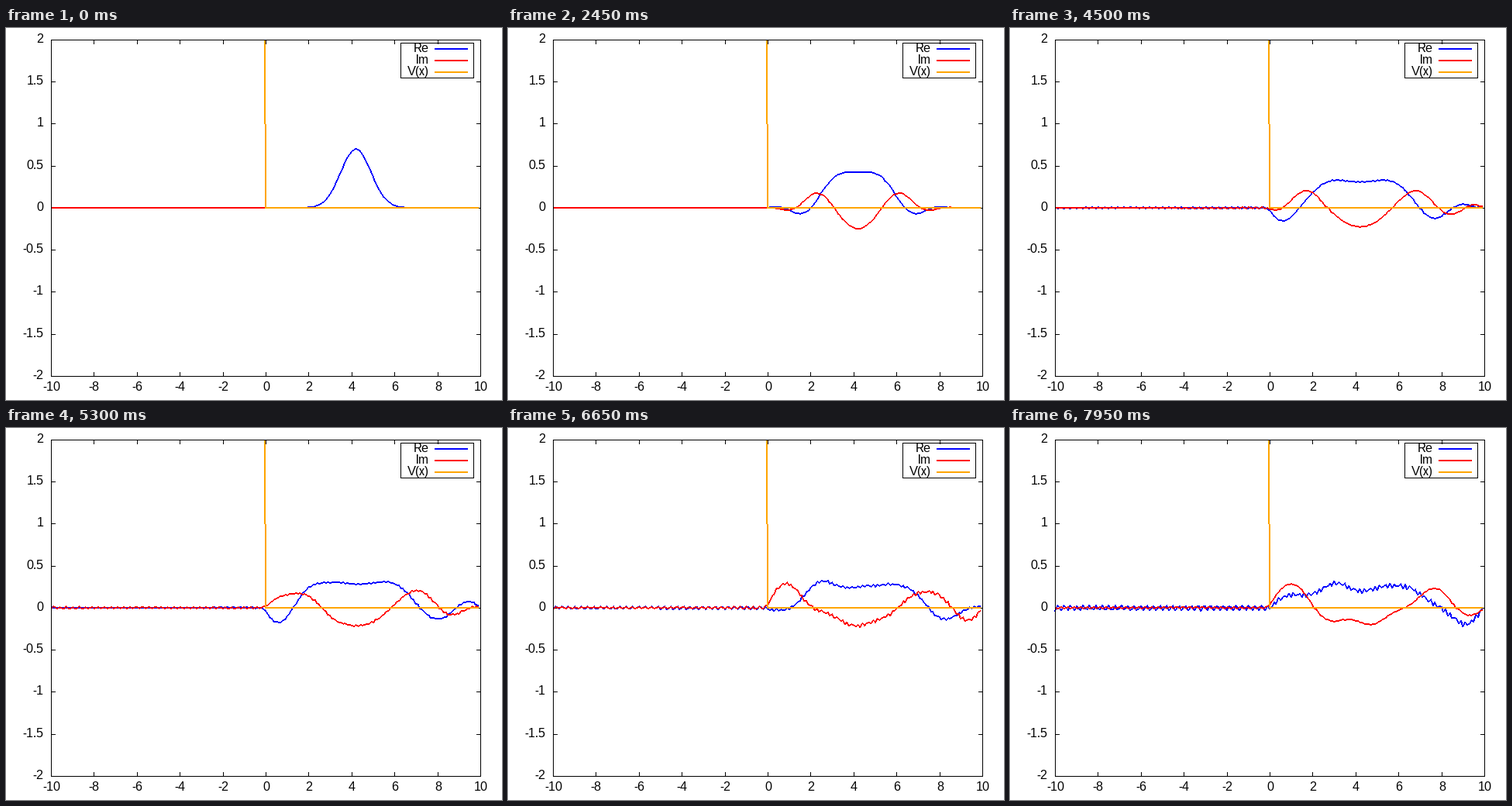
A matplotlib script for the animation above (8 s loop, 640 px wide and 480 px high).

```python
import numpy as np
import matplotlib.pyplot as plt
from matplotlib.animation import FuncAnimation

W, H, DPI = 640, 480, 100
FRAMES, INTERVAL = 160, 50
LEFT, RIGHT, TOP, BOTTOM = 58, 612, 15, 449
PX = 72 / DPI
BLUE, RED, ORANGE = (0, 0, 255), (255, 0, 0), (255, 165, 0)

# Split-step evolution of a Gaussian packet beside a high wall (x < 0).
N = 200
SPREAD = 0.0355 / 4      # kinetic phase per step for k = 1
WALL = 2.34              # potential phase per step
x = -10 + 20 / N * np.arange(N)
k = 2 * np.pi * np.fft.fftfreq(N, 20 / N)


def evolve():
    psi = 0.7 * np.exp(-(x - 4.2) ** 2) + 0j
    half = np.exp(-0.5j * WALL * (np.arange(N) < N // 2))
    drift = np.exp(-1j * SPREAD * k ** 2)
    states = [psi]
    for _ in range(FRAMES - 1):
        psi = half * np.fft.ifft(drift * np.fft.fft(half * psi))
        states.append(psi)
    return states


def px(v):
    return np.floor(LEFT + (v + 10) / 20 * (RIGHT - LEFT) + 0.5).astype(int)


def py(v):
    return np.ceil(BOTTOM - (v + 2) / 4 * (BOTTOM - TOP) - 0.5).astype(int)


def trace(canvas, us, vs, color):
    """Paint a hard-edged polyline two pixels thick."""
    rgba = (*color, 255)
    for u, v, du, dv in zip(us, vs, np.diff(us), np.diff(vs)):
        n = max(abs(du), abs(dv))
        if n == 0:
            continue
        t = np.arange(n + 1) / n
        cols = u + np.sign(du) * np.floor(abs(du) * t + 0.5).astype(int)
        rows = v + np.sign(dv) * np.floor(abs(dv) * t + 0.5).astype(int)
        steep = abs(dv) > abs(du)
        canvas[rows, cols] = rgba
        canvas[rows - (not steep), cols - steep] = rgba


plt.rcParams["font.family"] = "Liberation Sans"
plt.rcParams["text.hinting"] = "default"
plt.rcParams["text.hinting_factor"] = 1
fig = plt.figure(figsize=(W / DPI, H / DPI), dpi=DPI, facecolor="white")
ax = fig.add_axes([0, 0, 1, 1])
ax.axis("off")


def thin(us, vs, z):
    ax.plot(np.array(us) + 0.5, np.array(vs) + 0.5, color="black", lw=PX,
            antialiased=False, snap=False, solid_capstyle="projecting",
            zorder=z)


def box(x0, y0, x1, y1):
    for y in (y0, y1):
        thin([x0, x1], [y, y], 5)
    for u in (x0, x1):
        thin([u, u], [y0, y1], 5)


def label(u, y, s, align):
    ax.text(u + 0.5, y + 4, s, fontsize=16 * PX, ha=align, va="baseline",
            zorder=6)


for v in np.arange(-10, 11, 2):
    u = px(v)
    thin([u, u], [TOP, TOP + 5], 1)
    thin([u, u], [BOTTOM - 5, BOTTOM], 1)
    label(u, 464, f"{v:g}", "center")
for v in np.arange(-2, 2.5, 0.5):
    y = py(v)
    thin([LEFT, LEFT + 5], [y, y], 1)
    thin([RIGHT - 5, RIGHT], [y, y], 1)
    label(48, y, f"{v:g}", "right")

box(LEFT, TOP, RIGHT, BOTTOM)
box(509, 19, 603, 64)

xs = px(x)
mid, zero = px(0), py(0)
legend = [("Re", BLUE), ("Im", RED), ("V(x)", ORANGE)]
for i, (name, _) in enumerate(legend):
    label(545, 27 + 15 * i, name, "right")

states = evolve()
layer = ax.imshow(np.zeros((H, W, 4), np.uint8), extent=(0, W, H, 0),
                  interpolation="nearest", aspect="auto", zorder=3)
ax.set_xlim(0, W)
ax.set_ylim(H, 0)


def draw(i):
    canvas = np.zeros((H, W, 4), np.uint8)
    trace(canvas, xs, py(states[i].real), BLUE)
    trace(canvas, xs, py(states[i].imag), RED)
    trace(canvas, [mid - 1, mid, xs[-1]], [TOP, zero, zero], ORANGE)
    for j, (_, color) in enumerate(legend):
        trace(canvas, [553, 595], [27 + 15 * j] * 2, color)
    layer.set_data(canvas)
    return layer,


anim = FuncAnimation(fig, draw, frames=FRAMES, interval=INTERVAL,
                     repeat=True, repeat_delay=0)
plt.show()
```
